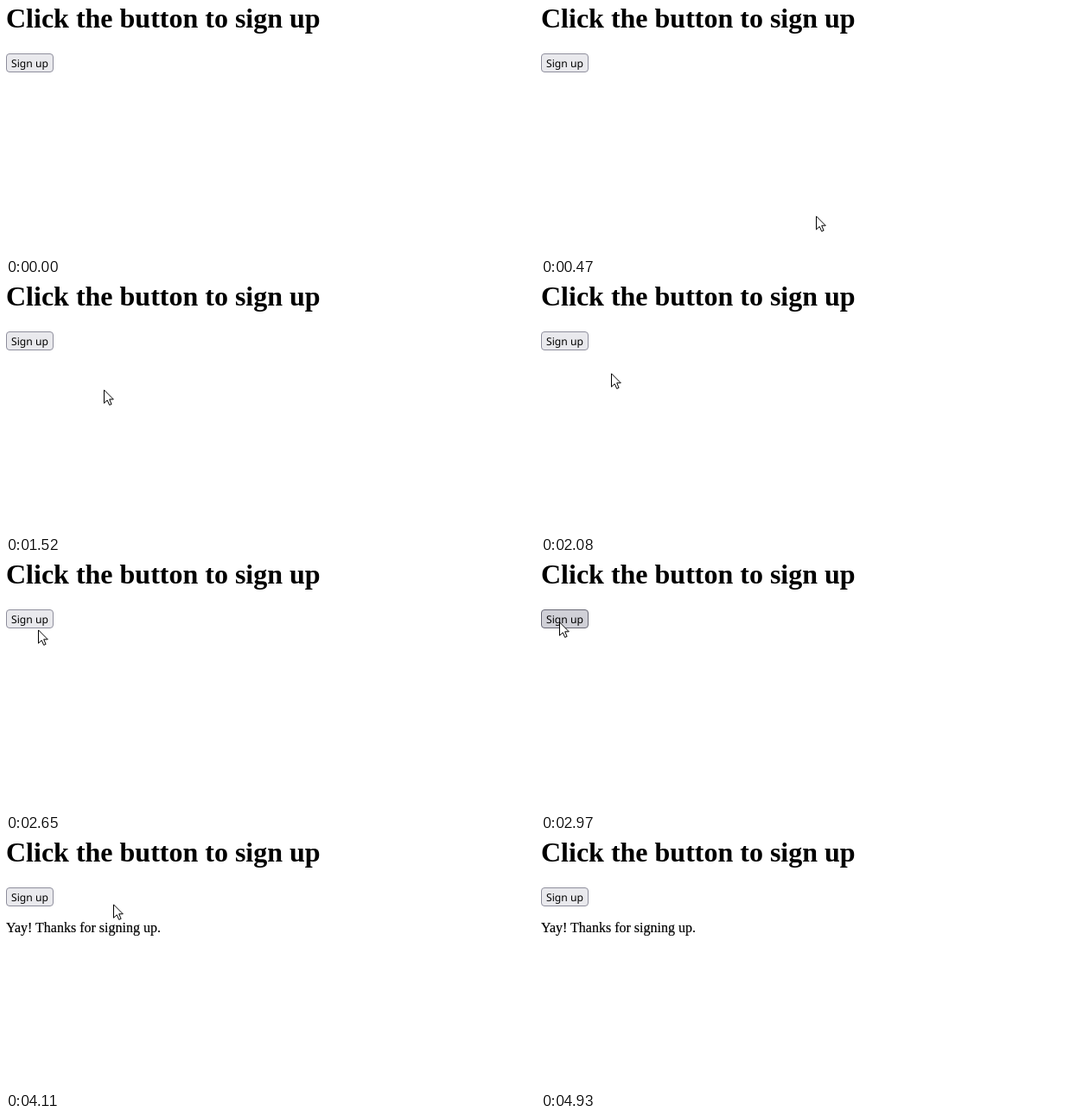
Write an HTML page that moves like this. It is 612 by 290 pixels and loops after 5.59 s.

```html
<!DOCTYPE html>
<html lang="en">
<head>
<meta charset="utf-8">
<title>Sign up</title>
<style>
  html, body { margin: 0; width: 100%; height: 100%; overflow: hidden; background: #fff; }
  svg { display: block; width: 612px; height: 290px; }
  text { fill: #000; white-space: pre; }
  .serif { font-family: "Liberation Serif", "Times New Roman", serif; }
  .title { font-size: 32px; font-weight: bold; }
  .note { font-size: 16px; stroke: #000; stroke-width: 0.2px; }
  .label { font: 12.2px "Noto Sans", "Open Sans", sans-serif; text-rendering: geometricPrecision; }
  .idle { fill: #e9e9ed; stroke: #8f8f9d; }
  .hover { fill: #d0d0d7; stroke: #676774; }
  .active { fill: #b1b1b9; stroke: #484851; }
  #cursor { fill: #fff; stroke: #000; }
</style>
</head>
<body>
<svg viewBox="0 0 612 290">
  <text class="serif title" x="0" y="25">Click the button to sign up</text>
  <rect id="button" class="idle" x="0.5" y="55.5" width="54" height="21" rx="3.5"/>
  <text class="label" x="6" y="71">Sign up</text>
  <text id="note" class="serif note" x="0" y="107" visibility="hidden">Yay! Thanks for signing up.</text>
  <path id="cursor" visibility="hidden"
    d="M.5 .9V16.3L4.2 12.8L6.7 18.4L9.1 17.4L6.7 11.8H11.3Z"/>
</svg>
<script>
const LOOP = 5590, TICK = 70;
const ENTER = 140, PRESS = 3230, RELEASE = 3330, LEAVE = 4930;

// Pointer route: time, x, y of the tip
const route = [
  [ENTER, 397, 269], [470, 318, 243], [660, 249, 211], [1220, 143, 138],
  [1520, 113, 122], [2410, 62, 92], [2650, 37, 78], [2970, 21, 69],
  [3680, 21, 69], [4110, 124, 74], [4210, 141, 79], [4830, 482, 264]
];

const [button, note, cursor] = ["button", "note", "cursor"].map(id => document.getElementById(id));

// The tip glides along the route but is only refreshed once per tick
function tipAt(t) {
  const i = Math.max(0, route.findLastIndex(p => p[0] <= t));
  const from = route[i], to = route[i + 1] || from;
  const held = Math.floor((t - from[0]) / TICK) * TICK;
  const k = Math.max(0, held) / (to[0] - from[0] || Infinity);
  return [1, 2].map(n => Math.round(from[n] + (to[n] - from[n]) * k));
}

function setShown(el, on) {
  el.setAttribute("visibility", on ? "visible" : "hidden");
}

function draw(t) {
  const [x, y] = tipAt(t);
  const pressed = t >= PRESS && t < RELEASE;
  const over = x < 55 && y < 77;
  cursor.setAttribute("transform", `translate(${x} ${y})`);
  button.setAttribute("class", pressed ? "active" : over ? "hover" : "idle");
  setShown(cursor, t >= ENTER && t < LEAVE);
  setShown(note, t >= RELEASE);
}

const start = performance.now();

function loop() {
  draw((performance.now() - start) % LOOP);
  requestAnimationFrame(loop);
}
loop();
</script>
</body>
</html>
```
